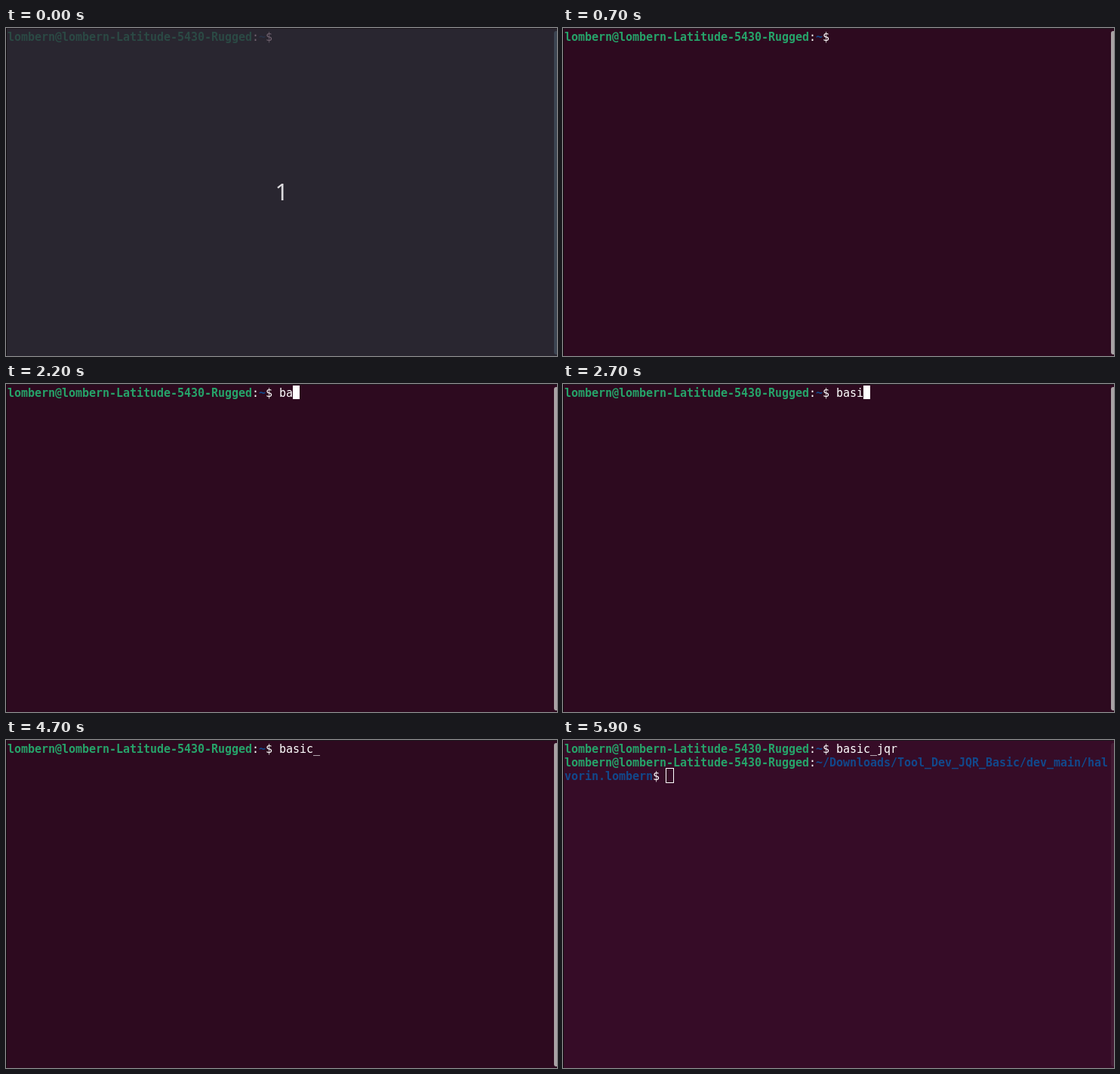
An HTML page with a canvas that plays this animation: 730 by 434 pixels, repeating every 8 s.

```html
<!DOCTYPE html>
<html lang="en">
<head>
<meta charset="utf-8">
<style>
  html, body { margin: 0; width: 100%; height: 100%; overflow: hidden; background: #2d0a1f; }
  canvas { display: block; }
</style>
</head>
<body>
<canvas id="stage" width="730" height="434"></canvas>
<script>
const ctx = document.getElementById('stage').getContext('2d');
const LOOP = 8000, CELL = 9, LINE = 18, LEFT = 2, TOP = 2;
const INPUT_COLUMN = 40, END_COLUMN = 15;
const HOST = 'lombern@lombern-Latitude-5430-Rugged';
const PATH = '~/Downloads/Tool_Dev_JQR_Basic/dev_main/hal';

const LIVE = { back: '#2d0a1f', bar: '#a9a3a5', host: '#26a269', path: '#12488b', text: '#ffffff' };
const IDLE = { ...LIVE, back: '#360c27', bar: '#431b34' };
const FADING = { ...LIVE, back: '#310b23', bar: '#765f6c' };
const DIMMED = { back: '#292630', bar: '#3c4552', host: '#2b4944', path: '#293347', text: '#71626f' };

// Start time, typed text, cursor visible
const typing = [
  [0, '', false], [200, '', true], [700, '', false], [900, '', true],
  [1000, 'b', true], [1100, 'ba', true], [1600, 'ba', false], [2200, 'ba', true],
  [2500, 'bas', true], [2700, 'basi', true], [3000, 'basic', true], [3600, 'basic', false],
  [4000, 'basic', true], [4100, 'basic_', true], [4700, 'basic_', false],
  [4800, 'basic_j', true], [5000, 'basic_jqr ', true], [5300, 'basic_jqr ', false]
];

function write(text, column, row, color, weight = 400) {
  ctx.font = `${weight} 15px "DejaVu Sans Mono", monospace`;
  ctx.fillStyle = color;
  [...text].forEach((char, i) =>
    ctx.fillText(char, LEFT + (column + i) * CELL, TOP + row * LINE + 15));
}

function prompt(row, path, colors) {
  write(HOST, 0, row, colors.host, 700);
  write(':', HOST.length, row, colors.text);
  write(path, HOST.length + 1, row, colors.path, 700);
}

function cursor(column, row, hollow = false) {
  const x = LEFT + column * CELL, y = TOP + row * LINE;
  if (hollow) {
    ctx.strokeStyle = '#ffffff';
    ctx.strokeRect(x - 0.5, y - 0.5, CELL + 1, LINE + 1);
  } else {
    ctx.fillStyle = '#ffffff';
    ctx.fillRect(x, y, CELL, LINE);
  }
}

function palette(t) {
  if (t < 100) return DIMMED;
  if (t < 5700) return LIVE;
  return t < 5900 ? FADING : IDLE;
}

function drawFrame(colors) {
  ctx.fillStyle = colors.back;
  ctx.fillRect(0, 0, 730, 434);
  ctx.fillStyle = '#1d171e';
  ctx.fillRect(0, 0, 730, 1);
  ctx.fillStyle = '#0d0a0d';
  ctx.fillRect(0, 0, 1, 434);
  ctx.fillStyle = colors.bar;
  ctx.beginPath();
  ctx.roundRect(726, 4, 8, 428, 3);
  ctx.fill();
}

function draw(t) {
  const colors = palette(t);
  drawFrame(colors);

  const [, typed, cursorOn] = typing.findLast(([start]) => start <= t);
  prompt(0, '~', colors);
  write('$', HOST.length + 2, 0, colors.text);
  write(typed, INPUT_COLUMN, 0, colors.text);
  if (cursorOn) cursor(INPUT_COLUMN + typed.length, 0);

  if (t >= 5400) {
    prompt(1, PATH, colors);
    write('vorin.lombern', 0, 2, colors.path, 700);
    write('$', 13, 2, colors.text);
    cursor(END_COLUMN, 2, t >= 5700);
  } else if (t >= 5300) {
    cursor(0, 1);
  }

  if (t < 100) {
    ctx.font = '31px "Noto Sans", sans-serif';
    ctx.fillStyle = '#dcdbde';
    ctx.fillText('1', 356.5, 228);
  }
}

const begin = performance.now();
function tick() {
  draw((performance.now() - begin) % LOOP);
  requestAnimationFrame(tick);
}
tick();
</script>
</body>
</html>
```
